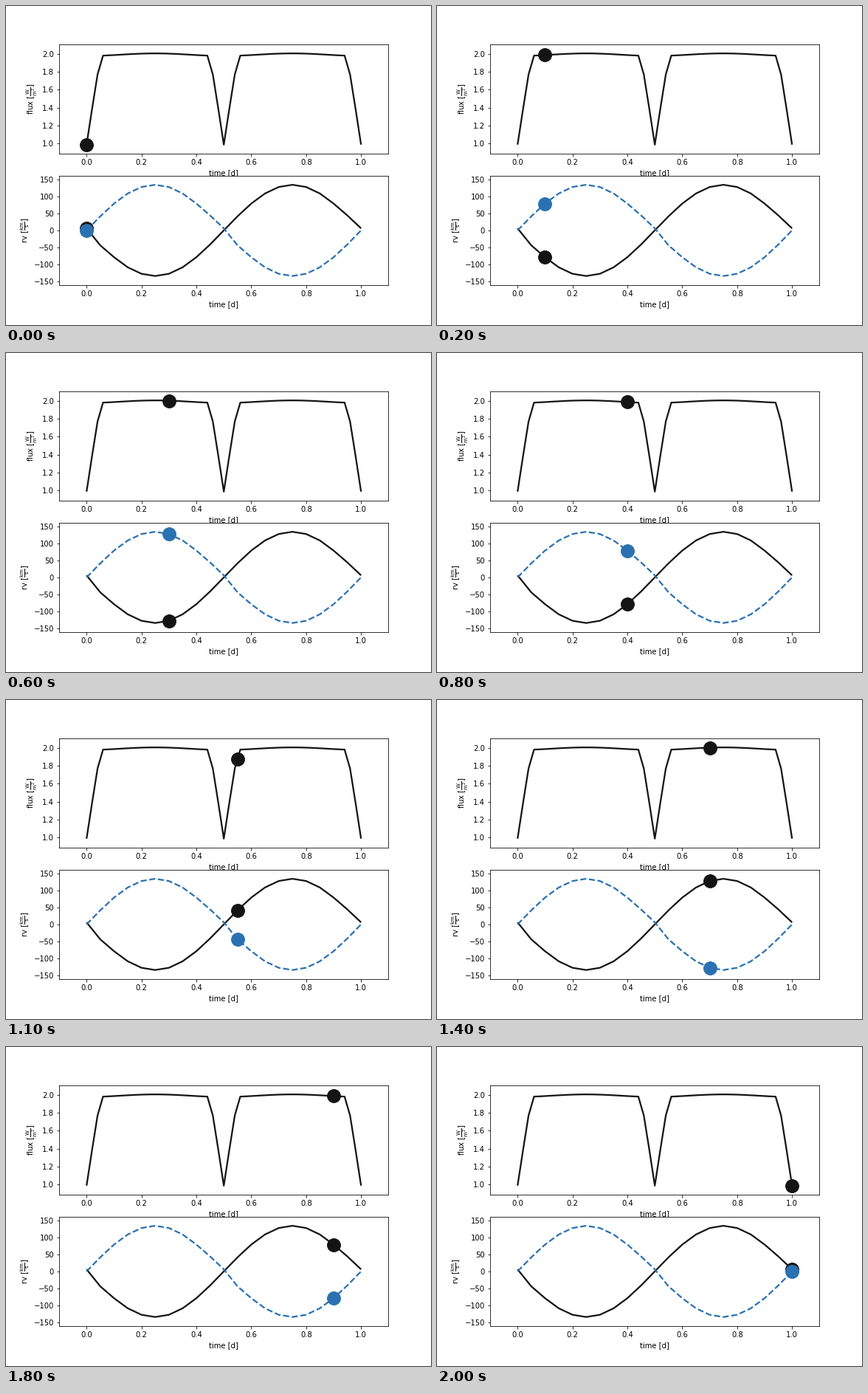
A matplotlib script that plays this animation: 576 px wide and 432 px high, repeating every 2.1 s.

```python
import numpy as np
import matplotlib.pyplot as plt
from matplotlib.animation import FuncAnimation

BLACK, BLUE = "#141414", "#2b71b1"
LINE, DOT = 2.23, 17.86
STEPS = 21

plt.rcParams.update({"font.family": "DejaVu Sans", "font.size": 10})


def light_curve():
    """Two equal eclipses over an ellipsoidal baseline."""
    t = np.linspace(0, 1, 51)
    flux = 1.9918 - 0.0142 * np.cos(4 * np.pi * t)
    depth = np.abs((t + 0.25) % 0.5 - 0.25)
    dip = depth < 0.05
    flux[dip] = np.interp(depth[dip], [0, 0.02, 0.04], [0.986, 1.385, 1.77])
    return t, flux


def velocities():
    """Both stars, with the skew each shows while it is eclipsed."""
    t = np.linspace(0, 1, STEPS)
    rv1 = -134.07 * np.sin(2 * np.pi * t)
    rv2 = -rv1
    rv1[[0, 1, -2, -1]] = 6, -44, 44, 6
    rv2[[9, 10, 11]] = 44, 6, -44
    return t, rv1, rv2


def padded(low, high):
    pad = 0.1 * (high - low)
    return low - pad, high + pad


def add_curve(ax, t, y, color, style="-"):
    ax.plot(t, y, style, color=color, lw=LINE, solid_capstyle="butt")
    dot, = ax.plot([], [], "o", color=color, ms=DOT, mew=1, zorder=5)
    return dot, t, y


fig, (top, bottom) = plt.subplots(2, 1, figsize=(8, 6), dpi=72)
fig.subplots_adjust(left=0.125, right=0.9, bottom=0.125, top=0.88, hspace=0.2)

t, flux = light_curve()
t_rv, rv1, rv2 = velocities()
curves = [
    add_curve(top, t, flux, BLACK),
    add_curve(bottom, t_rv, rv1, BLACK),
    add_curve(bottom, t_rv, rv2, BLUE, "--"),
]

for ax in (top, bottom):
    ax.set_xlim(-0.1, 1.1)
    ax.set_xticks(np.arange(6) / 5)
    ax.set_xlabel("time [d]")

top.set_ylim(padded(flux.min(), flux.max()))
top.set_yticks(np.arange(5, 11) / 5)
top.set_ylabel(r"flux [$\mathrm{\frac{W}{m^{2}}}$]")

bottom.set_ylim(padded(-134.07, 134.07))
bottom.set_yticks(np.arange(-150, 151, 50))
bottom.set_ylabel(r"rv [$\mathrm{\frac{km}{s}}$]")


def update(i):
    now = i / (STEPS - 1)
    for dot, ts, ys in curves:
        dot.set_data([now], [np.interp(now, ts, ys)])
    return [dot for dot, _, _ in curves]


anim = FuncAnimation(fig, update, frames=STEPS, interval=100, repeat=True,
                     repeat_delay=0, blit=False)
plt.show()
```
